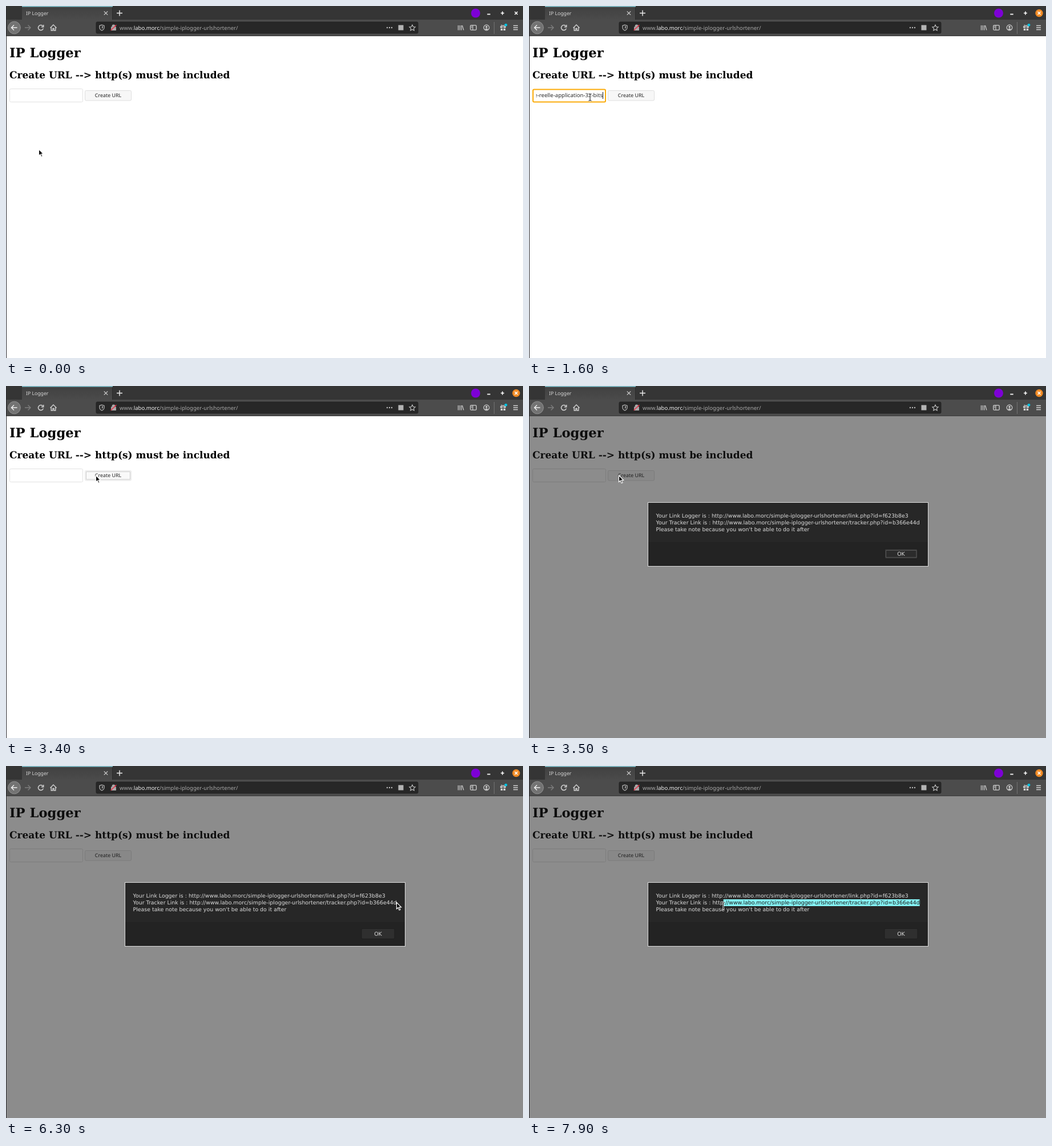
An HTML page with a canvas for the animation above (8000 ms loop, 906 by 618 pixels).

```html
<!DOCTYPE html>
<html lang="en">
<head>
<meta charset="utf-8">
<title>IP Logger</title>
<style>
  html, body { margin: 0; width: 100%; height: 100%; overflow: hidden; background: #fff; }
  canvas { display: block; }
</style>
</head>
<body>
<canvas id="stage" width="906" height="618"></canvas>
<script>
const ctx = document.getElementById('stage').getContext('2d');
const LOOP = 8000, STEP = 100;

const UI = '"Noto Sans", "Open Sans", sans-serif';
const DIALOG_FONT = '9.42px "DejaVu Sans", sans-serif';
const SERIF = '"DejaVu Serif", serif';

// Moments of the hard changes, in ms
const FOCUS = 1100, PASTE = 1600, PRESS = 3300, SUBMIT = 3400,
      DIALOG = 3500, BLUR_OK = 5400, DRAG = 7100;

// Pointer path: time, x, y
const PATH = [
  [0, 57, 251], [400, 48, 165],
  [500, 48, 165], [800, 72, 171], [1200, 107, 160.5],
  [1600, 107, 160.5], [1900, 167, 156], [2300, 24, 158],
  [2600, 24, 158], [2800, 60, 152], [3100, 157, 156.5],
  [3500, 157, 156.5], [3600, 189, 163],
  [3700, 189, 163], [4600, 668, 239.5],
  [4800, 685, 236], [5000, 685, 236], [5100, 685, 237.5],
  [5300, 685, 237.5], [5600, 663.5, 239.5],
  [5700, 663.5, 239.5], [5800, 667.5, 239.5],
  [5900, 667.5, 239.5], [6300, 684, 239],
  [6500, 684, 239], [6600, 682.5, 240.5],
  [6700, 682.5, 240.5], [6800, 681.5, 240.5],
  [7000, 681.5, 240.5], [7900, 340.5, 245.5], [8000, 340.5, 245.5]
];

const TRACKER = "Your Tracker Link is : http://www.labo.morc/simple-iplogger-urlshortener/tracker.php?id=b366e44d";
const MESSAGE = [
  "Your Link Logger is : http://www.labo.morc/simple-iplogger-urlshortener/link.php?id=f623b8e3",
  TRACKER,
  "Please take note because you won't be able to do it after"
];

function rect(x, y, w, h, fill) {
  ctx.fillStyle = fill;
  ctx.fillRect(x, y, w, h);
}

function box(x, y, w, h, radius, fill, stroke, width = 1) {
  ctx.beginPath();
  ctx.roundRect(x, y, w, h, radius);
  paint(undefined, fill, stroke, width);
}

function circle(x, y, r, fill, stroke, width) {
  const p = new Path2D();
  p.arc(x, y, r, 0, 2 * Math.PI);
  paint(p, fill, stroke, width);
}

function paint(path, fill, stroke, width = 1) {
  const args = path ? [path] : [];
  if (fill) { ctx.fillStyle = fill; ctx.fill(...args); }
  if (stroke) { ctx.strokeStyle = stroke; ctx.lineWidth = width; ctx.stroke(...args); }
}

// Draws an icon whose path is centred on (x, y)
function icon(x, y, d, stroke, width = 1.3, fill) {
  ctx.save();
  ctx.translate(x, y);
  paint(new Path2D(d), fill, stroke, width);
  ctx.restore();
}

function text(str, x, y, font, color, align = 'left') {
  ctx.font = font;
  ctx.fillStyle = color;
  ctx.textAlign = align;
  ctx.fillText(str, x, y);
  return x + ctx.measureText(str).width;
}

function pointerAt(t) {
  const i = PATH.findIndex(key => key[0] > t);
  const [t0, x0, y0] = PATH[i - 1], [t1, x1, y1] = PATH[i];
  const k = (t - t0) / (t1 - t0);
  return { x: x0 + (x1 - x0) * k, y: y0 + (y1 - y0) * k };
}

function drawTitleBar(active) {
  rect(0, 0, 906, 25, '#353535');
  const tab = ctx.createLinearGradient(0, 0, 0, 25);
  tab.addColorStop(0, '#414141');
  tab.addColorStop(1, '#4b4b4b');
  rect(28, 0, 159, 25, tab);
  rect(28, 0, 159, 1.5, '#85c9d6');
  rect(186, 2, 1, 22, '#2b2b2b');
  text('IP Logger', 35, 15.7, '8.7px ' + UI, '#d8d8d8');
  icon(175, 12.5, 'M-3.2-3.2 3.2 3.2M3.2-3.2-3.2 3.2', '#d0d0d0', 1.2);
  icon(199, 12.5, 'M-5 0H5M0-5V5', '#eee', 1.4);

  circle(823, 12.5, 8, '#7d00d6');
  icon(846, 14.5, 'M-2.7 0H2.7', '#fff', 1.8);
  icon(870, 12.5, 'M-3 0H3M0-3V3', '#fff', 1.6);
  if (active) circle(894, 12.5, 6.7, '#f08a24');
  icon(894, 12.5, 'M-2.5-2.5 2.5 2.5M2.5-2.5-2.5 2.5', '#fff', 1.6);
}

function drawToolbar() {
  const light = '#d2d2d2';
  rect(0, 24, 906, 29, '#4c4c4c');
  rect(0, 52, 906, 1, '#3a3a3a');

  circle(14.5, 38, 10.8, '#737373', '#929292');
  icon(14.5, 38, 'M5 0H-4.5M-.5-4.5-5 0-.5 4.5', '#eee', 1.5);
  icon(38, 38, 'M-5 0H4.5M.5-4.5 5 0 .5 4.5', '#7d7d7d', 1.4);
  icon(61, 38, 'M3.6-2.6A4.5 4.5 0 1 0 4.3 1.4M4.7-5V-1.3H1', light, 1.5);
  icon(83, 38, 'M-5.5.5 0-5 5.5.5M-3.8-.5V5H-1V1.5H1V5H3.8V-.5', light, 1.4);

  box(158, 28, 564, 20, 2, '#272727', '#222');
  icon(168, 38, 'M0-4.8 4-3.6V0Q3.8 3.4 0 5-3.8 3.4-4 0V-3.6Z', '#bbb', 1.2);
  icon(168, 38, 'M0-2.8V3Q2-.2 2-2.2Z', null, 0, '#bbb');
  icon(188.5, 38, 'M-3.8-.8H3.8V4.5H-3.8ZM-2.3-1V-2.5A2.3 2.3 0 0 1 2.3-2.5V-1', '#aaa', 1.2, '#aaa');
  icon(188.5, 38, 'M-4.8 4.8 4.8-4.8', '#e8334a', 1.6);

  const font = '9.58px ' + UI;
  let x = text('www.', 199, 41.5, font, '#a9a9a9');
  x = text('labo.morc', x, 41.5, font, '#f4f4f4');
  text('/simple-iplogger-urlshortener/', x, 41.5, font, '#a9a9a9');

  for (const dx of [-4, 0, 4]) circle(672 + dx, 38, 1.2, '#bbb');
  box(687.5, 33.5, 9, 9, 0, '#b4b4b4');
  icon(712, 38.3, 'M0-5.2 1.6-1.8 5.2-1.4 2.5 1.1 3.2 4.7 0 2.9-3.2 4.7-2.5 1.1-5.2-1.4-1.6-1.8Z', '#c4c4c4', 1.1);

  icon(797, 38, 'M-4.5-4V4.5M-1.7-4V4.5M1.1-4V4.5M2.5-3.8 5 4.4', light, 1.2);
  box(813.8, 33.8, 10.4, 8.4, 1.5, null, light, 1.3);
  icon(819, 38, 'M-1-4V4M-3.7-2H-2M-3.7 0H-2', light, 1.1);
  circle(842, 38, 4.8, null, light, 1.2);
  circle(842, 36.8, 1.8, light);
  icon(842, 38, 'M-3 2.8Q0-.2 3 2.8Q0 5-3 2.8Z', null, 0, light);
  rect(855, 28, 1, 21, '#737373');
  icon(871, 38, 'M-5-2.5H-.7V.3H-5ZM.7-2.5H5V.3H.7ZM-4.2 1.6H-.7V5H-4.2ZM.7 1.6H4.2V5H.7Z', null, 0, light);
  icon(871, 38, 'M0-2.8Q-3.5-6-3-3.2M0-2.8Q2-5.5 2.5-3.5', light, 1.1);
  circle(876, 33.3, 2.4, '#00c8e8');
  icon(893, 38, 'M-4-3.5H4M-4 0H4M-4 3.5H4', light, 1.3);
}

function drawPage(t) {
  rect(0, 53, 906, 565, '#fff');
  text('IP Logger', 6, 89.5, 'bold 22.67px ' + SERIF, '#000');
  text('Create URL --> http(s) must be included', 6, 127, 'bold 17px ' + SERIF, '#000');

  const focused = t >= FOCUS && t < PRESS;
  if (focused) box(7, 146.5, 127, 22, 2, '#fff', '#fbab0a', 2);
  else box(6.5, 145.5, 128, 23, 2, '#fff', '#e2e2e2');

  const pasted = t >= PASTE && t < SUBMIT;
  if (pasted) {
    ctx.save();
    ctx.beginPath();
    ctx.rect(12.5, 147, 117.5, 20);
    ctx.clip();
    text('e-reelle-application-32-bits', 129, 160, '9.58px ' + UI, '#2b2b2b', 'right');
    ctx.restore();
  }
  if (focused) rect(pasted ? 129 : 13, 151, 1, 12, '#111');

  const ringed = t >= PRESS && t < DIALOG;
  box(138.5, 148.5, 81, 17.5, 2, '#f7f7f7', ringed ? '#e6e6e6' : '#dedede');
  if (ringed) box(140.5, 150.5, 77, 13.5, 0, '#f9f9f9', '#cbcbcb');
  text('Create URL', 179, 160, '8.9px ' + UI, '#222', 'center');
}

// The selection runs from the first character right of the pointer to the end of the line
function drawSelection(pointerX) {
  const left = 222.5;
  ctx.font = DIALOG_FONT;
  const edge = i => left + ctx.measureText(TRACKER.slice(0, i)).width;
  let i = TRACKER.length;
  while (i > 0 && edge(i - 1) > pointerX) i--;
  const start = edge(i), end = edge(TRACKER.length);
  rect(start, 234, end - start, 12, '#84f3f5');
  ctx.save();
  ctx.beginPath();
  ctx.rect(start, 234, end - start, 12);
  ctx.clip();
  text(TRACKER, left, 243.3, DIALOG_FONT, '#1c1c1c');
  ctx.restore();
}

function drawDialog(t, pointerX) {
  rect(0, 53, 906, 565, 'rgba(26,26,26,.5)');
  rect(208, 204, 492, 113, '#dcdcdc');
  rect(209, 205, 490, 111, '#272727');
  rect(209, 274, 490, 42, '#232323');
  MESSAGE.forEach((line, i) => text(line, 222.5, 231.3 + 12 * i, DIALOG_FONT, '#dcdcdc'));
  if (t >= DRAG) drawSelection(pointerX);

  box(623, 285.5, 58, 18, 2, '#2f2f2f', '#1e1e1e');
  if (t < BLUR_OK) box(625.5, 288.5, 53.5, 12.5, 0, '#2b2b2b', '#5c5c5c');
  text('OK', 652, 298, DIALOG_FONT, '#dcdcdc', 'center');
}

function drawPointer(t, { x, y }) {
  const overText = t < DIALOG
    ? x > 7 && x < 134 && y > 146 && y < 169
    : x > 222 && x < 683.5 && y > 222 && y < 258;
  if (overText) {
    const beam = 'M-2.5-6Q0-6 0-4.5Q0-6 2.5-6M0-5V5M-2.5 6Q0 6 0 4.5Q0 6 2.5 6';
    icon(x, y, beam, '#fff', 2.4);
    icon(x, y, beam, '#111', 1);
  } else {
    icon(x, y, 'M.5.5V12L3.2 9.6 5.1 14 7 13.1 5.1 8.9H8.6Z', '#fff', 1.2, '#000');
  }
}

function frame(now) {
  const t = Math.floor(now % LOOP / STEP) * STEP;
  const pointer = pointerAt(t);
  ctx.textRendering = 'geometricPrecision';
  drawPage(t);
  if (t >= DIALOG) drawDialog(t, pointer.x);
  drawTitleBar(t >= FOCUS);
  drawToolbar();
  rect(0, 0, 1, 618, '#2b2b30');
  drawPointer(t, pointer);
}

const begin = performance.now();
(function tick() {
  frame(performance.now() - begin);
  requestAnimationFrame(tick);
})();
</script>
</body>
</html>
```
